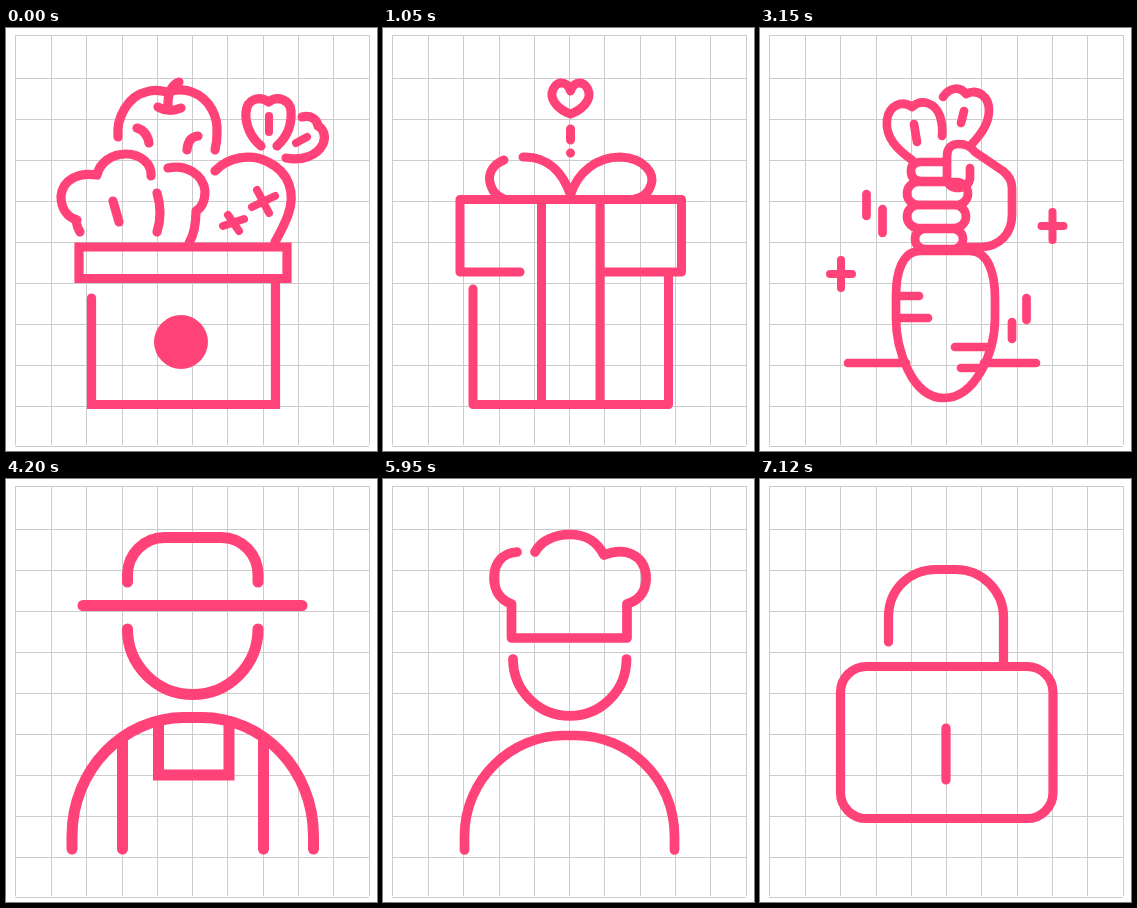
Recreate the animation shown at these times as an HTML page. Size 371 by 423 pixels, loop 7.59 s.

```html
<!DOCTYPE html>
<html lang="en">
<head>
<meta charset="utf-8">
<title>Line icons</title>
<style>
html, body { margin: 0; width: 371px; height: 423px; overflow: hidden; background: #fff; }
svg { display: block; }
#icon { fill: none; stroke: #ff4277; stroke-linecap: round; stroke-linejoin: round; }
#icon .sharp { stroke-linejoin: miter; }
#icon .dot { fill: #ff4277; stroke: none; }
</style>
</head>
<body>
<svg width="371" height="423" viewBox="0 0 371 423">
  <path id="grid" fill="none" stroke="#ccc" stroke-width="1"/>
  <g id="icon"></g>
</svg>
<script>
const line = (d, w) => `<path d="${d}"${w ? ` stroke-width="${w}"` : ''}/>`;
const sharp = d => `<path class="sharp" d="${d}"/>`;
const dot = (x, y, r) => `<circle class="dot" cx="${x}" cy="${y}" r="${r}"/>`;
const plus = (x, y) => line(`M${x - 11} ${y}h22M${x} ${y - 14}v28`, 8);
const pill = (x, y, w, h) =>
  `<rect x="${x}" y="${y}" width="${w}" height="${h}" rx="${h / 2}"/>`;

const box = [
  sharp('M73 219H281V250.500H73Z'),
  sharp('M85.500 270V376.500H269.500V251'),
  dot(175, 314, 27),
  // apple
  line('M112 109C110 90 122 68 140 64C148 61 154 62 161 64C168 62 178 61 186 64C205 71 212 90 211 105C211 113 210 118 209 122'),
  line('M173 54Q161 59 162 80M152 79Q163 85 175 80M131 100Q141 103 143 115M181 122Q182 109 192 108'),
  // broccoli
  line('M74 204Q69 195 71 192C61 189 55 180 55 168C57 151 73 144 91 147C94 134 106 126 120 126C136 126 146 137 145 148'),
  line('M162 140C180 136 197 146 199 163C199 173 195 180 190 183C190 195 189 205 183 215M151 165Q157 185 151 204M107 173L113 194'),
  // beet
  line('M209 143C222 129 245 125 262 134C283 144 290 165 282 187Q278 198 269 214'),
  line('M251 162L263 185M246 179L269 168M222 187L233 203M217 198L238 191', 8),
  line('M255 118C243 108 239 94 240 84C241 72 252 67 262.500 74C272 67 284 72 285 83C286 97 282 108 271 118'),
  line('M263 88V104M290 115L301 109', 8),
  line('M296 89C305 87 311 91 312 98C318 101 320 109 317 116C311 128 296 133 280 130')
];

const gift = [
  line('M90 261V376.500H285.500V246M137 244H77V171.500H298.500V244H217M158.500 172V376M217 172V376'),
  line('M187.500 167C180 145 165 128 140 129M187.500 167C195 143 215 129 237 129C262 130 272 146 268 157Q264 169 252 171M121 132C108 137 104 148 108 158Q111 167 121 171'),
  line('M187.500 101V112M187.500 125V125.100'),
  line('M187.500 86C176 82 168 73 169 65C171 53 184 51 187.500 63C191 51 204 53 206 65C207 73 199 82 187.500 86Z')
];

const bin = [
  line('M80 139H60L107 368H266L314 139H292'),
  // apple
  line('M140 80C128 74 113 78 105 89C94 102 97 126 107 139C115 149 122 153 130 152Q140 150 150 152C160 153 167 147 173 138C184 122 186 99 172 86C163 76 150 75 140 80Z'),
  line('M146 67Q139 72 139 92M127 90Q139 96 152 91M114 104Q124 112 114 121M160 118Q149 126 160 133'),
  // carrot
  line('M222 151C215 151 213 157 210 163L188 209C182 222 180 230 182 238C191 242 210 234 225 222C240 210 255 198 262 188Q268 180 260 174L230 152Q226 149 222 151Z'),
  line('M234 152L243 132M247 163L267 138M259 172L277 159'),
  line('M219 172L224 187M214 182L229 177M212 200L218 212M208 208L222 204', 6.5),
  // fish
  line('M137 245L117 279L153 277Z'),
  line('M153 278C165 268 185 270 203 276Q205 285 213 287Q218 288 220 285C235 294 238 308 233 321C223 338 196 340 176 323Q178 308 163 309Q155 296 153 278Z'),
  line('M206 299L195 318'),
  line('M214 307L219 319M210 316L222 310', 6)
];

const harvest = [
  line('M160 223H210C228 223 235 245 235 270V290C235 325 215 370 184 370C151 370 136 320 136 290V268C136 245 142 223 160 223Z'),
  line('M138 268H159M138 290H168M195 319H231M201 340H222M88 335H146M224 335H276'),
  line('M186 134H160Q151 135 151 143Q151 152 160 153H187'),
  pill(147, 154, 61, 23), pill(147, 177, 59, 23), pill(155, 201, 48, 20),
  line('M208 219H220C240 219 252 205 252 187V160Q252 150 243 143L215 124Q209 116 199 116Q187 116 187 128V150Q188 160 199 160Q209 159 210 150V140'),
  line('M152 132C138 122 125 110 127 92C129 77 142 72 152 79C162 70 175 75 180 88C182 95 183 101 182 108M154 96L157 114'),
  line('M183 69C190 59 200 58 206 66C218 60 229 69 229 82C229 95 222 105 212 116M204 83L201 95'),
  line('M106.500 166V188M122.500 181V205M266.500 270V292M252 294V311'),
  plus(81, 246), plus(292.5, 198)
];

const farmer = [
  line('M121.500 103V96C121.500 75 138 58.500 159 58.500H215C236 58.500 252 75 252 96V103M77 126.500H296'),
  line('M121.500 150A65.250 65.500 0 0 0 252 150'),
  line('M66 370V357C66 290 118 238.500 178 238.500H196C256 238.500 307.500 290 307.500 357V370M116.500 262V370M257.500 262V370'),
  sharp('M152.500 246V296H223V246')
];

const chef = [
  line('M134 73C117 74 111 87 111 99C111 112 118 121 128.500 125V159H244V125C258 121 264 110 263 96C261 77 243 67 221 76C213 61 202 55.500 187 55.500C171 55.500 158 62 152 73'),
  line('M130 180A56.750 57 0 0 0 243.500 180'),
  line('M81.500 371V357C81.500 299 130 256.500 180 256.500H193C245 256.500 291.500 299 291.500 357V371')
];

const lock = [
  '<rect x="80.5" y="187.500" width="212.500" height="152" rx="26"/>',
  line('M128.500 163V138C128.500 110 150 90.500 176 90.500H196C222 90.500 243.500 112 243.500 138V187M186 249V301')
];

// shapes, line weight, duration in ms
const scenes = [
  [box, 9.2, 1050], [gift, 9, 1050], [bin, 8.5, 1050], [harvest, 8.7, 1050],
  [farmer, 11, 1050], [chef, 9.7, 1170], [lock, 9.2, 1170]
];
const total = scenes.reduce((sum, s) => sum + s[2], 0);

let grid = '';
for (let i = 0; i <= 10; i++) {
  const x = Math.round(9.7 + i * 35.3) + 0.5 - (i ? 0.5 : 1);
  const y = i ? Math.round(9 + i * 41) : 7;
  grid += `M${Math.floor(x) + 0.5} 7V417M9 ${Math.min(y, 418) + 0.5}H363`;
}
document.getElementById('grid').setAttribute('d', grid);

const icon = document.getElementById('icon');
let shown = -1;

function draw(ms) {
  let t = ms % total, i = 0;
  while (t >= scenes[i][2]) t -= scenes[i++][2];
  if (i === shown) return;
  shown = i;
  icon.setAttribute('stroke-width', scenes[i][1]);
  icon.innerHTML = scenes[i][0].join('');
}

const start = performance.now();
function tick() {
  draw(performance.now() - start);
  requestAnimationFrame(tick);
}
draw(0);
requestAnimationFrame(tick);
</script>
</body>
</html>
```
